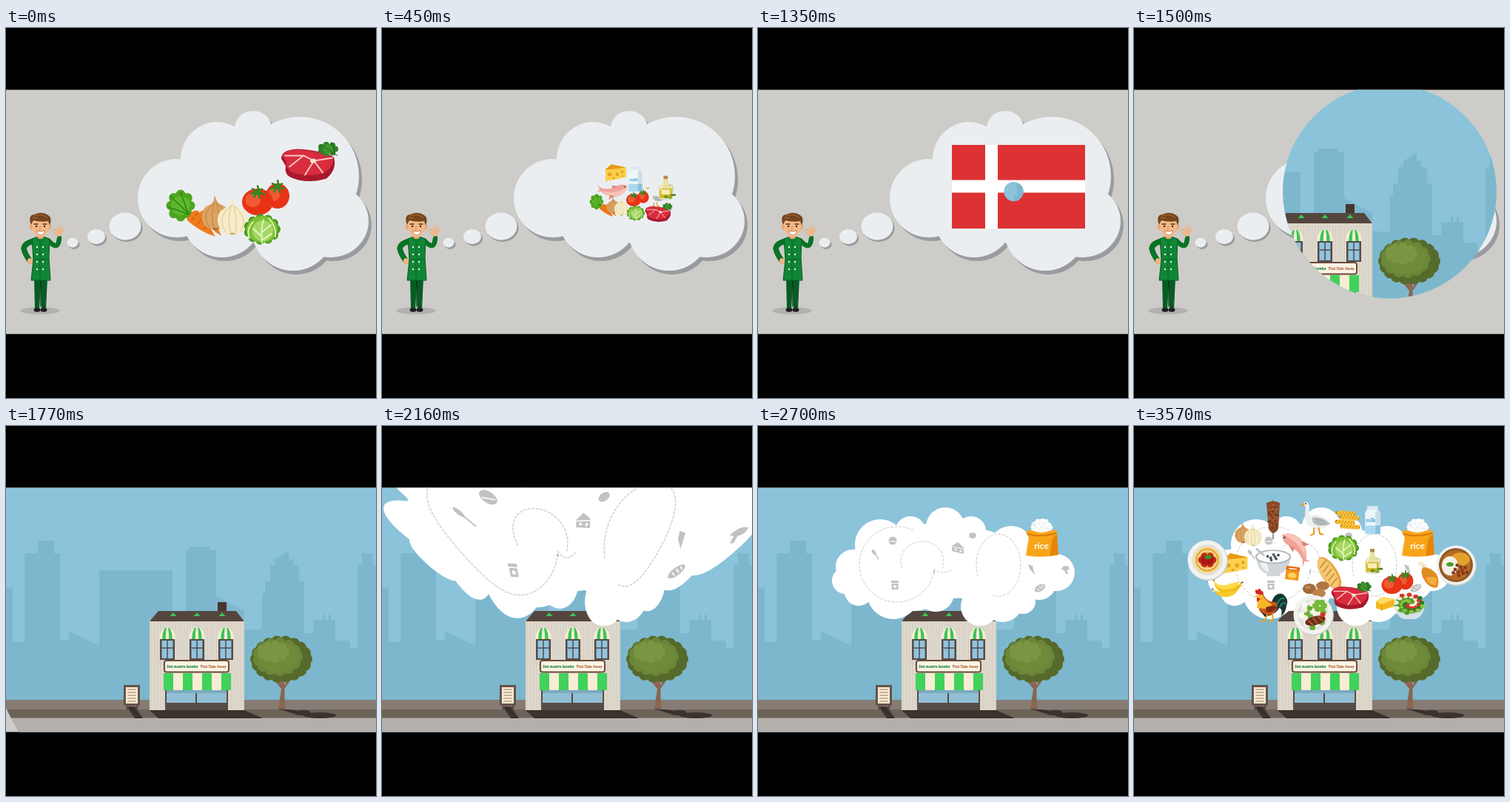
An HTML page for the animation above (3.75 s loop, 500x500 px).

```html
<!DOCTYPE html>
<html lang="da">
<head>
<meta charset="utf-8">
<title>Food ideas</title>
<style>
  html, body { margin: 0; width: 100%; height: 100%; overflow: hidden; background: #000; }
  svg { display: block; width: 100vw; height: 100vh; }
  text { font-family: Lato, "Open Sans", sans-serif; text-anchor: middle; }
</style>
</head>
<body>
<svg id="stage" viewBox="0 0 500 500"></svg>
<script>
// Drawing helpers: each returns SVG markup
const el = (x, y, rx, ry, fill) => `<ellipse cx="${x}" cy="${y}" rx="${rx}" ry="${ry}" fill="${fill}"/>`;
const dot = (x, y, r, fill) => el(x, y, r, r, fill);
const re = (x, y, w, h, fill, r = 0, more = '') => `<rect x="${x}" y="${y}" width="${w}" height="${h}" rx="${r}" fill="${fill}" ${more}/>`;
const pa = (d, fill, more = '') => `<path d="${d}" fill="${fill}" ${more}/>`;
const li = (d, color, w = 1, more = '') => pa(d, 'none', `stroke="${color}" stroke-width="${w}" stroke-linecap="round" stroke-linejoin="round" ${more}`);
const tx = (x, y, size, fill, s, weight = 700) => `<text x="${x}" y="${y}" font-size="${size}" font-weight="${weight}" fill="${fill}">${s}</text>`;
const at = (x, y, body, s = 1, rot = 0) => `<g transform="translate(${x} ${y}) rotate(${rot}) scale(${s})">${body}</g>`;
const many = (n, fn) => Array.from({ length: n }, (_, i) => fn(i)).join('');
const ring = (n, rx, ry, size, fill) => many(n, i => {
  const a = i / n * 2 * Math.PI;
  return dot((rx * Math.cos(a)).toFixed(1), (ry * Math.sin(a)).toFixed(1), size, fill);
});
const scatter = (n, r, fn) => many(n, i => {
  const d = r * Math.sqrt((i + .5) / n), a = i * 2.4;
  return fn((d * Math.cos(a)).toFixed(1), (d * Math.sin(a)).toFixed(1), i);
});
const pick = (list, i) => list[i % list.length];

// Food, centred on the origin
const carrot = pa('M-6-2Q-2-9 5-6Q16 8 24 28Q7 18-6-2Z', '#ef7a1d') +
  li('M0 0l4-3M5 7l5-3M12 14l4-1', '#c9540c', 1);
const stem = li('M0-8Q2-3 0 0L-9 3M0 0l-5 7M0 0l3 8M0 0l9 3M0 0l6-4M0 0l-7-4', '#2e8b22', 2.6);
const tomato = (rx, ry) => el(0, 0, rx, ry, '#e83316') + el(-rx * .3, -ry * .15, rx * .5, ry * .55, '#f25a35') +
  at(0, -ry * .75, stem);
const bulb = (fill, shade) => pa('M0-26Q2-17 7-15Q21-10 20 4Q18 22 0 22Q-18 22-20 4Q-21-10-7-15Q-2-18-2-27Z', fill) +
  li('M-3-16Q-22 0-9 19M-1-18Q-8 0-2 21M1-18Q7 0 4 21M3-16Q22 0 11 18', shade, .7) + el(0, 21, 4, 1.5, shade);
const plate = body => dot(1, 1, 27, '#c9cdcc') + dot(0, 0, 26.5, '#f2f2ef') + dot(0, 0, 21, '#e1e2df') + body;
const fusilli = (x, y) => at(x, y, li('M-11 0H11', '#d88b13', 5) + many(6, i => li(`M${-11 + i * 4} 2.5l3-5`, '#fbc43b', 2.4)), 1, 4);

const food = {
  carrots: at(-16, -12, ring(8, 13, 15, 6.5, '#4da51f') + dot(0, 0, 13, '#5fb82c') +
      li('M-14-13L12 12M0-18L10 10M-17 2L12 12', '#2f8418', 1.6)) +
    at(15, 1, carrot) + at(3, 2, carrot, 1.05, -4) + at(-1, 8, carrot, 1.05, -15),
  onions: at(-13, -2, bulb('#dda362', '#a86f36'), .92) + at(10, 3, bulb('#f6ecc8', '#cab679')),
  tomatoes: at(16, -2, tomato(16, 17)) + at(-11, 6, tomato(21, 18)),
  cabbage: ring(11, 19, 15, 6, '#4b9b1e') + el(0, 0, 21, 18, '#7cc036') + el(1, 2, 14, 14, '#a6d765') +
    li('M0 19Q-2 0 2-13M0 10L-12-1M0 4L12-6M-17 12Q-22 0-12-10M18 10Q20-3 9-15M1 14L13 6', '#e9f7c4', 1.7),
  meat: pa('M-39-4Q-39-16-17-17Q17-15 32-6Q37 10 22 23Q-5 31-27 21Q-35 17-33 6Z', '#a9182c') +
    pa('M-38-8Q-30-18-12-16Q20-12 31-5Q32 8 17 16Q-5 22-25 14Q-34 8-32 0Z', '#d92c3f') +
    li('M-34-8L-9-8L5-1L30-5M5-1L-7 18M5-1L17 15M-9-8L-28 7', '#f6c4bd', 2) +
    el(4, -1, 4, 3, '#f3e1d2') +
    at(24, -17, ring(7, 10, 6, 4, '#2f7f24') + dot(0, 0, 7, '#3f972c') + li('M-9-5L13 9M5-9L10 8', '#24691d')),
  cheese: pa('M-29-10L-12-24L28-15V12L-29 23Z', '#f6b92c') + pa('M-29-10L-12-24L28-15L-29-9Z', '#e59a17') +
    pa('M-29-8L28-14V12L-29 23Z', '#fbd04c') + el(-17, 4, 6, 5, '#e6a51f') + el(4, 4, 5, 5, '#e6a51f') +
    el(18, -3, 4, 4, '#e6a51f') + el(-6, 15, 4, 3, '#e6a51f') + el(19, 9, 3, 2, '#e6a51f'),
  milk: pa('M-18-18L-13-26H14L20-18V35H-18Z', '#eef5f9') + re(-13, -35, 27, 9, '#dce7ef') +
    pa('M8-18L14-26L20-18V35H8Z', '#c9dce8') + re(-18, 14, 26, 21, '#a9d9f0') + re(8, 14, 12, 21, '#87bfdd') +
    tx(-4, 6, 13, '#3da0d4', 'milk'),
  fish: pa('M-43-17L-30-7Q-8-1 15-14Q31-22 43-12Q39 8 14 16Q-12 20-32 1L-42 4L-35-5Z', '#f0a39a') +
    pa('M-27 0Q-5 9 20 0Q36-7 42-10Q38 8 14 16Q-12 20-27 0Z', '#f8c4b8') +
    pa('M-6 12L-10 25L8 15ZM2-6L-2-15L16-13Z', '#e18379') + dot(35, -11, 2, '#333'),
  goose: pa('M-19-24Q-16-31-11-26Q-7-20-10-10Q-9-4-3-6Q14-8 27 9Q14 20 0 17Q-15 14-16 0Q-16-10-15-19Z', '#eef0ef') +
    pa('M-4-2Q13-4 27 9Q12 15 2 11Q-5 7-4-2Z', '#b9bec0') + li('M2 5Q12 10 20 9M1 1Q10 3 17 5', '#8c9295') +
    pa('M-18-27L-25-23L-17-22Z', '#f29a26') + li('M-1 17V26L-6 28M7 16L9 26L14 27', '#ee9124', 2.5) + dot(-15, -25, 1.2, '#333'),
  oil: el(2, 29, 19, 5, '#d9e0d2') +
    pa('M-6-30H6V-16Q19-7 19 4V25Q19 31 12 31H-12Q-19 31-19 25V4Q-19-7-6-16Z', '#e8e2a2') +
    pa('M-17 2H17V28H-17Z', '#d4b925') + re(-6, -34, 12, 9, '#b9874a', 2) + re(-12, 5, 24, 13, '#f8eebb') +
    li('M-8-13Q-13-3-14 7', '#fff', 2) + li('M10-8Q27-11 18 13', '#b9c798', 2.5) +
    at(7, 25, el(-6, 0, 6, 4, '#718d22') + el(6, 2, 6, 4, '#92aa32') + el(14, -5, 8, 3, '#4d8529')),
  rice: scatter(70, 13, (x, y, i) => el(x, y - 12, 3, 2.2, pick(['#fff', '#eff0f2', '#fafafa'], i))) +
    pa('M-21-7Q-18-13-10-9Q0-5 10-9Q19-13 22-7L19 0L23 23Q0 28-21 24L-17 0Z', '#f9a51a') +
    pa('M15 1L21-6L23 23L11 25Z', '#e88508') + li('M-18-5Q0 0 19-6', '#d87909', 2) +
    tx(0, 15, 12, '#fff', 'rice'),
  doner: re(-1, -27, 2, 54, '#999') + pa('M-9-22Q0-27 9-22L7 13Q0 24-6 13Z', '#8a4a28') +
    scatter(45, 7, (x, y, i) => el(x, -4 + y * 2.4, 2, 1.1, pick(['#a9623a', '#6d3519', '#95522d'], i))),
  noodles: fusilli(-2, -9) + fusilli(3, -3) + fusilli(-3, 3) + fusilli(4, 9),
  yogurt: pa('M-22-6Q-20 12-8 16V19H9V16Q20 12 23-6Z', '#cfd5d9') + pa('M-17 2Q-13 13-5 14L-9-2Z', '#eef1f2') +
    el(0, -6, 23, 9, '#aab2b7') + el(0, -6, 21, 7.5, '#fcfcfc') +
    scatter(7, 9, (x, y) => dot(x, -6 + y * .5, 1.8, '#46525d')) + li('M-12-8L-21-16', '#b9c0c4', 2.5),
  box: at(0, 0, re(-9, -9, 18, 18, '#f49419') + re(-9, -9, 18, 5, '#e26a14') + el(0, 3, 6, 4, '#fbd257') + li('M-5-6H5', '#fff', 1.4), 1, 7),
  bread: at(0, 0, el(0, 0, 11, 25, '#e4a641') + el(-1, -1, 9, 23, '#f4c874') +
    many(5, i => li(`M-6 ${-13 + i * 7}L5 ${-17 + i * 7}`, '#cf8e2e', 1.6)), 1, -32),
  drumstick: li('M2 6L9 16', '#f2e3c8', 5) + dot(11, 16, 3, '#f6ead4') + pa('M-9-18Q3-19 9-3Q12 8 7 11Q-3 10-10 0Q-14-10-9-18Z', '#e08d20') +
    pa('M-8-15Q2-14 5-4Q-5-1-10-7Z', '#f3ad42'),
  bananas: pa('M-19-9Q-16 4 3 0Q13-2 20-6Q18 5 4 8Q-15 10-19-9Z', '#f4be19') +
    pa('M-18-9Q-10 1 4-5L17-8Q13 2 0 3Q-15 4-18-9Z', '#fdd94a') +
    pa('M-19 3Q-8 9 14 4Q9 14-5 13Q-15 11-19 3Z', '#f8c928') + li('M-18-9l-1-3M19-6l2-1M-19 3l-1-1', '#6d4a12', 1.6),
  rooster: pa('M2 0Q6-18 18-15Q27-8 23 1Q22 10 16 15Q18 4 13 4Q9 12 0 13Z', '#17352f') + li('M10 0Q14-11 20-9M14 2Q19-5 22-2', '#1f7a6b', 2.2) +
    pa('M-15-13Q-13-20-8-15Q-5-4 9-4Q14 6 2 14Q-15 14-15 0Z', '#c9541a') + pa('M-15-13Q-9-18-7-9L4 0L-5 5L-17 4Z', '#f9b52a') +
    pa('M-5 3Q6-1 10 3Q4 12-4 9Z', '#7e2a15') + pa('M-14 6Q-8 14 2 13L-6 16Z', '#26302c') +
    pa('M-18-15Q-21-23-16-20Q-13-25-11-19Q-7-19-9-14ZM-17-11L-17-4L-12-8Z', '#dc1f24') +
    pa('M-16-14L-22-11L-15-11Z', '#f5bf2b') + li('M-3 13L-6 21L-12 22M4 12L5 21L0 22', '#e7a41c', 2),
  potatoes: el(-9, 0, 9, 7, '#a06a38') + el(9, -4, 9, 6, '#b0763e') + el(4, 6, 9, 6, '#bc8448') + el(-11, -2, 4, 2, '#c0895a'),
  salad: pa('M-21-4Q-18 14-7 17H8Q19 14 22-4Z', '#d3e2e6') + el(0, -3, 21, 13, '#8fb9a6') +
    scatter(44, 19, (x, y, i) => el(x, -4 + y * .7, 3.4, 2.7, pick(['#4f9e2a', '#d9352b', '#8ac53d', '#f4ecd4', '#2f7a25'], i))),
  butter: pa('M-12-3L-3-9L13-6L12 4L-4 9L-12 6Z', '#f7b61e') + pa('M-12-3L-3-9L13-6L-4 1Z', '#fddc61') + li('M-4 1V9', '#e29b12'),
  pasta: plate(dot(0, 0, 18, '#f1c868') +
    many(6, i => `<circle r="${5 + i * 2.4}" fill="none" stroke="${pick(['#d99d37', '#fbe09a'], i)}" stroke-width="1.3"/>`) +
    ring(6, 8, 6, 4.5, '#c9291a') + el(0, 0, 9, 7, '#a81a12') + el(1, -4, 5, 3, '#3d8d2c')),
  roast: plate(scatter(22, 18, (x, y, i) => dot(x, y, 4, pick(['#f3f0e4', '#69ad35', '#fbf8ee'], i))) +
    at(3, 8, el(0, 0, 14, 6, '#6e2d19') + li('M-9-2L-5 4M-2-4L2 4M5-4L9 2', '#b15b32', 2), 1, -14) + at(9, -12, ring(6, 6, 5, 4, '#77ba39')) + dot(13, 0, 3.5, '#d83122')),
  curry: plate(dot(0, 0, 23, '#8d5a26') + dot(0, 0, 20, '#b66a24') + el(6, -8, 13, 9, '#e3a12b') + el(-8, 1, 11, 13, '#f4f1e7') +
    scatter(10, 15, (x, y) => dot(x * .7 + 6, y * .6 + 7, 2.4, '#87391a')) + el(-8, -1, 5, 3, '#4e9a31'))
};

const chef = el(46, 382, 27, 5, '#b2b2b2') +
  pa('M38 338H56L54 380H48L47 347L45 380H39Z', '#075c25') + li('M47 341V376', '#033a16', 1.4) +
  el(42, 381, 4.5, 2.8, '#211d1d') + el(51, 381, 4.5, 2.8, '#211d1d') +
  li('M37 288Q25 291 24 298Q26 307 33 315', '#0a7327', 7.5) + dot(33, 315, 4, '#eeb080') +
  li('M58 288Q68 299 71 290L72 284', '#0a7327', 6.5) +
  el(71, 278, 4, 3.5, '#f4b889') +
  li('M69 279Q63 277 65 273Q69 271 70 276M71 276L72 268M73 277L76 268M74 278L79 271', '#efb182', 2) +
  pa('M35 285Q46 279 59 285L58 310L60 341H34L37 313Z', '#118636', 'stroke="#055b20"') +
  li('M41 283L47 290L53 283M46 290V340M37 313H58', '#07672a', 1) +
  many(8, i => dot(i % 2 ? 50 : 42, 296 + (i >> 1) * 10, 1.2, '#f5f3df')) +
  re(42, 276, 9, 9, '#dda06d', 3) + el(34, 269, 2, 4, '#eaa873') + el(59, 269, 2, 4, '#eaa873') +
  pa('M35 259Q46 253 58 259V270Q56 282 47 283Q38 282 35 270Z', '#f4b985') +
  pa('M34 266Q29 253 38 252Q49 247 57 253Q63 256 59 267L57 261Q47 263 37 260Z', '#75451f') +
  li('M39 253Q49 251 55 256M36 256L43 257', '#9c652f', 1.3) +
  li('M38 265l5 0M50 265l5 0', '#593218', 1.3) + dot(41, 268, 1.2, '#2d2018') + dot(52, 268, 1.2, '#2d2018') +
  pa('M41 274Q47 276 53 274Q51 280 47 280Q42 279 41 274Z', '#fff', 'stroke="#a54c38" stroke-width=".6"') + li('M47 267L45 272H48', '#d18c59', .8);

const thought = el(231, 230, 53, 53, '') + el(285, 178, 49, 51, '') + el(334, 136, 25, 24, '') + el(397, 200, 80, 80, '') +
  el(438, 261, 52, 49, '') + el(388, 268, 57, 60, '') + el(292, 258, 53, 52, '') + el(340, 215, 80, 75, '');
const bubbles = el(161, 268, 21.5, 18.5, '') + el(122, 282, 12, 10, '') + el(90, 290, 7.5, 6.5, '');
const tint = (body, fill, dx = 0, dy = 0) => `<g fill="${fill}" transform="translate(${dx} ${dy})">${body.replace(/ fill=""/g, '')}</g>`;

const flag = re(-90, -56.5, 180, 113, '#dd3234') + re(-45, -56.5, 17, 113, '#fff') + re(-90, -9, 180, 17, '#fff');

const skyline = pa('M0 370V218H9V292H25V172H43V155H65V172H73V290H85V277L126 297V195H225V292H243V168H248V163H276V168H284V230L322 250V275H346V226H350V210H357V188H364V180L382 168V180H388V188H396V210H403V280H415V262H428V255H431V262H436V255H439V262H445V290H465V300H475V188H481V172H496V188H500V370Z', '#7db7ce');

// Arched awning in five stripes that meet at the top
const awning = x => pa(`M${x - 11} 288Q${x - 10} 273 ${x} 272.5Q${x + 10} 273 ${x + 11} 288Z`, '#f6edd7') +
  [-1, 1].map(s => pa(`M${x + s * 2.2} 288Q${x + s * 2} 276 ${x + s} 273L${x + s * 3} 273Q${x + s * 6.5} 277 ${x + s * 6.8} 288Z`, '#3cc653')).join('');
const archWindow = x => re(x - 10, 288, 20, 28, '#534b47') + re(x - 7.5, 290, 15, 24, '#92c4df') +
  li(`M${x} 290V314M${x - 7} 300H${x + 7}`, '#534b47', 1.5) + awning(x);

const house = pa('M194 384H322L347 395H206Z', '#39322d') + re(194, 262, 128, 122, 'url(#wall)') + re(286, 238, 12, 14, '#49352f') +
  pa('M206 250H311L322 264H194Z', '#54463f') + [226, 258, 292].map(x => pa(`M${x - 4.5} 257L${x} 252L${x + 4.5} 257Z`, '#3cc653')).join('') +
  [218, 258, 297].map(archWindow).join('') +
  re(214, 317, 87, 15.5, '#fbf4e4', 3, 'stroke="#6c4b3e" stroke-width="2"') +
  tx(238.5, 326.5, 4.9, '#147d3b', 'Det muntre komfur', 900) + tx(280, 326.5, 5.2, '#a44c28', 'Thai Take Away') +
  re(215, 355, 85, 29, '#554c46') + re(217, 357, 39, 17, '#91bfd4') + re(258, 357, 40, 17, '#91bfd4') + re(217, 357, 81, 4, '#7aaac0') +
  many(7, i => re(213 + i * 13, 334, 13, 23, i % 2 ? '#f9edd6' : '#41d25c', 1));

const board = pa('M163 379H174L185 395H174Z', '#39322d') + li('M164 377V382M177 377V382', '#5b4a42', 3) + re(159, 350, 22, 28, '#665249', 1) + re(162, 353, 16, 22, '#faedd2') +
  many(5, i => li(`M164.5 ${356 + i * 4}H175.5`, '#8e7666', 1));

const tree = pa('M367 382L390 384L420 391H396Z', '#39322d') + el(424, 391, 22, 4, '#39322d') + el(402, 387, 10, 3, '#39322d') +
  pa('M370 335H376L377 382H368L372 355L361 342Z', '#8b6551') + li('M374 356L384 342', '#8b6551', 3) +
  at(372, 315, ring(18, 34, 24, 8, '#566a2b') + el(0, 0, 36, 27, '#566a2b')) +
  at(367, 312, ring(13, 26, 18, 8, '#6c8638') + el(0, 0, 28, 20, '#6f8a39')) +
  at(361, 305, ring(9, 16, 9, 6, '#7b9642') + el(0, 0, 16, 10, '#7b9642'));

const town = re(0, 83, 500, 331, '#8bc3da') + skyline + re(0, 370, 500, 13.5, '#867c75') + re(0, 383, 500, 12, '#6b6358') +
  re(0, 394.5, 500, 19, '#b5afab') + board + house + tree;

// Big white cloud: puffs are [x, y, radius]
const puffs = [[118, 209, 18], [128, 190, 23], [165, 160, 34], [206, 143, 21], [253, 136, 26], [288, 142, 20], [342, 165, 30],
  [375, 172, 30], [403, 198, 25], [380, 212, 23], [358, 237, 17], [330, 236, 29], [300, 244, 26], [240, 226, 25], [183, 225, 36],
  [136, 224, 19], [165, 195, 45], [210, 190, 60], [265, 178, 55], [300, 190, 50], [345, 197, 45]];
const swirls = [[188, 187, 51, 51, -65, -352], [222, 183, 29, 27, 160, 380], [325, 188, 30, 42, 160, 465], [250, 190, 13, 8, 160, 30]];
const grey = '#c2c2c2';
const icons = [
  [159, 174, at(0, 0, el(0, -4, 2.2, 4, grey) + li('M0 0V7', grey, 1.4), 1, -35)],
  [182, 155, dot(0, 0, 5.5, grey) + li('M-4 1H4', '#fff')],
  [270, 165, pa('M-8-3L0-8L8-1V8L-8 4Z', grey) + li('M-8-2L8 1', '#fff') + dot(-3, 2, 1.6, '#fff') + dot(4, 4, 1.6, '#fff')],
  [290, 148, el(0, 0, 5, 4, grey)],
  [185, 215, re(-5, -6, 10, 3, grey) + re(-4.5, -2, 9, 8, grey, 1) + dot(0, 2, 2, '#fff')],
  [369, 193, pa('M-4-6L2-4L5 8L-2 0Z', grey)],
  [381, 219, at(0, 0, el(0, 0, 8, 4.5, grey) + li('M-4-1L-2 2M0-2L2 2M4-2L5 1', '#fff'), 1, -30)],
  [415, 193, pa('M-5 1Q-3-6 5-3Q7 2 2 2L4 7L1 7L-1 2Z', grey)],
  [238, 197, dot(0, 0, 1.5, grey)]
];

// Stretches the cloud up and outwards from the roof; amount 0 leaves it alone
const warp = (x, y, amount) => {
  const dx = x - 250, h = Math.max(265 - y, 0), side = Math.abs(dx);
  const wide = 1 + amount * (h / 100) ** 2 * side / (dx < 0 ? 145 : 215);
  const lift = h * amount * (.3 + .0025 * side * h / 80);
  return [250 + dx * wide, y - lift - 250 * Math.max(0, amount - 1)];
};
const trace = (cx, cy, rx, ry, from, to, amount) => 'M' + Array.from({ length: 41 }, (_, i) => {
  const a = (from + (to - from) * i / 40) * Math.PI / 180;
  return warp(cx + rx * Math.cos(a), cy + ry * Math.sin(a), amount).map(v => v.toFixed(1)).join(' ');
}).join('L');
const drawCloud = amount =>
  pa(puffs.map(([x, y, r]) => trace(x, y, r, r, 0, 360, amount) + 'Z').join(''), '#fff') +
  swirls.map(s => li(trace(...s, amount), '#cbcbcb', 1 + amount * .3, 'stroke-dasharray="3 2.5"')).join('') +
  icons.map(([x, y, body]) => {
    const [px, py] = warp(x, y, amount), [ax, ay] = warp(x + 1, y, amount), [bx, by] = warp(x, y + 1, amount);
    return `<g transform="matrix(${ax - px} ${ay - py} ${bx - px} ${by - py} ${px} ${py})">${body}</g>`;
  }).join('');

// Thought ingredients: name, x, y, start of the fall
const basket = [['cheese', 290, 159, 230], ['milk', 344, 176, 130], ['goose', 398, 226, 30], ['oil', 430, 201, 80], ['fish', 280, 209, 180],
  ['carrots', 252, 252], ['onions', 296, 254], ['tomatoes', 351, 229], ['cabbage', 346, 272], ['meat', 411, 270, -41]];
// Foods on the white cloud by the time they pop up: name, x, y, scale, turn
const pops = {
  2610: [['rice', 383, 151]],
  2820: [['goose', 244, 125, .8], ['milk', 322, 127, .54], ['rooster', 183, 242], ['tomatoes', 356, 211, .67]],
  3000: [['onions', 155, 147, .6], ['oil', 322, 183, .5], ['bread', 264, 199], ['meat', 294, 229, .7], ['cabbage', 283, 165, .84]],
  3210: [['bananas', 126, 218], ['noodles', 288, 127], ['yogurt', 188, 183, 1.05], ['salad', 372, 244], ['box', 214, 199]],
  3390: [['doner', 188, 126], ['cheese', 137, 186, .58], ['drumstick', 399, 201, 1, 175], ['fish', 221, 164, .6, 235], ['butter', 339, 240], ['potatoes', 246, 220]],
  3570: [['pasta', 99, 181], ['roast', 242, 255], ['curry', 435, 188]]
};

const stage = document.getElementById('stage');
stage.innerHTML = `<defs>
  <clipPath id="screen">${re(0, 83.5, 500, 330, '#000')}</clipPath>
  <clipPath id="iris"><circle id="hole" cx="345.5" cy="221"/></clipPath>
  <pattern id="wall" width="4" height="8" patternUnits="userSpaceOnUse">${re(0, 0, 4, 8, '#dfd8cc')}${re(0, 0, 1.3, 8, '#d7cfc3')}</pattern>
  </defs>${re(0, 0, 500, 500, '#000')}
  <g clip-path="url(#screen)">
    <g id="kitchen">${re(0, 83, 500, 331, '#cdccc8')}
      ${tint(thought, '#9a9b9e', 4, 5)}${tint(thought, '#ebeef1')}${tint(bubbles, '#9a9b9e', 2, 2.5)}${tint(bubbles, '#ebeef1')}${chef}
      <g id="idea"></g></g>
    <g id="town" clip-path="url(#iris)">${town}<g id="cloud"></g></g>
  </g>`;
const [hole, idea, cloud] = ['hole', 'idea', 'cloud'].map(id => document.getElementById(id));
const clamp = v => Math.min(1, Math.max(0, v));

function drawIdea(t) {
  if (t > 552) return at(352, 214.5, flag, clamp((t - 540) / 210));
  const zoom = Math.min(1, (552 - t) / 212);
  const items = basket.filter(([, , , start = -999]) => t >= start).map(([name, x, y, start = -999]) =>
    at(x, 134 + (y - 134) * clamp((t - start) / 120), food[name])).join('');
  return `<g transform="translate(340 230) scale(${zoom}) translate(-340 -230)">${items}</g>`;
}

function drawTownIdeas(t) {
  if (t < 2010) return '';
  const amount = Math.max(0, (2520 - t) / 360) ** 1.5;
  return drawCloud(amount) + Object.entries(pops).filter(([start]) => t >= start)
    .map(([, list]) => list.map(([name, x, y, s, turn]) => at(x, y, food[name], s, turn)).join('')).join('');
}

let shown = -1;
function frame() {
  const t = Math.floor(performance.now() % 3750 / 30) * 30;
  if (t !== shown) {
    shown = t;
    hole.setAttribute('r', Math.max(0, (t - 1335) * .875));
    idea.innerHTML = t < 1800 ? drawIdea(t) : '';
    cloud.innerHTML = drawTownIdeas(t);
  }
  requestAnimationFrame(frame);
}
frame();
</script>
</body>
</html>
```
